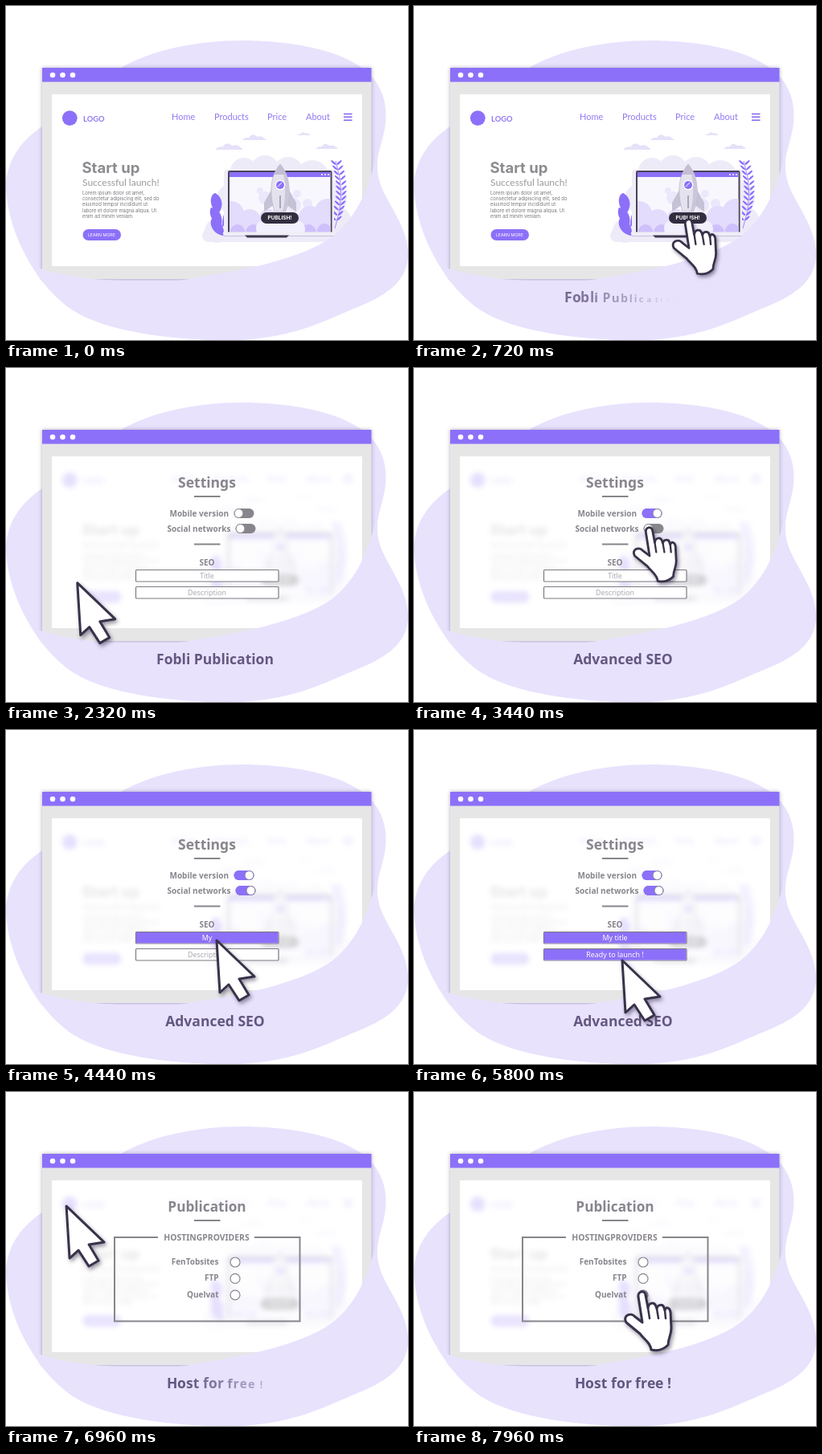
These frames come from a looping animation (500 px wide and 416 px high, 8000 ms). An HTML page:

```html
<!DOCTYPE html>
<html lang="en">
<head>
<meta charset="utf-8">
<title>Publication steps</title>
<style>
html, body { margin: 0; width: 100%; height: 100%; overflow: hidden; background: #fff; }
#stage { position: absolute; left: 0; top: 0; width: 500px; height: 416px; overflow: hidden; }
svg { position: absolute; left: 0; top: 0; }
text { white-space: pre; }
.ui { font: 700 10px "Noto Sans", sans-serif; fill: #88858c; }
.head { font-size: 17.5px; text-anchor: middle; }
.mid { text-anchor: middle; }
.end { text-anchor: end; }
.field { font: 400 8.9px "Noto Sans", sans-serif; text-anchor: middle; }
.nav { font: 400 11px Lato, sans-serif; fill: #9379f2; }
.small { font-family: Inter, sans-serif; }
.caption { position: absolute; left: 0; width: 520px; top: 349.5px; text-align: center; white-space: pre;
  font: 700 17.5px/24px "Noto Sans", sans-serif; color: #62587f; }
.caption span { display: inline-block; transform-origin: 50% 76%; }
#cursor { filter: drop-shadow(2px 3px 2.5px rgba(30, 20, 50, .45)); }
#cursor path { fill: #fff; stroke: #39324a; stroke-width: 3; stroke-linejoin: round; stroke-linecap: round; }
</style>
</head>
<body>
<div id="stage">
<svg width="500" height="416" viewBox="0 0 500 416">
  <defs>
    <path id="blob" d="M143 77C180 55 238 43 292 43C350 43 410 53 443 77C473 99 477 133 469 162C463 184 457 199 467 226C478 252 500 277 500 310C499 345 470 362 432 377C395 392 354 416 275 416C205 416 125 405 85 380C38 350 0 280 0 222C2 190 20 167 45 150Z"/>
    <clipPath id="inBlob"><use href="#blob"/></clipPath>
    <clipPath id="screen"><rect x="278" y="207" width="125.5" height="75"/></clipPath>
    <clipPath id="sheet"><rect x="57" y="110" width="386" height="214"/></clipPath>
  </defs>
  <use href="#blob" fill="#e8e2fd"/>

  <g style="filter:drop-shadow(0 0 2.5px rgba(60,50,90,.4))">
    <rect x="45" y="77" width="409.5" height="263" fill="#e6e6e7"/>
  </g>
  <rect x="45" y="77" width="409.5" height="17.5" fill="#8c70f9"/>
  <g fill="#fff"><circle cx="58" cy="86" r="3.3"/><circle cx="70.5" cy="86" r="3.3"/><circle cx="83" cy="86" r="3.3"/></g>
  <rect x="57" y="110" width="386" height="214" fill="#fff"/>

  <g clip-path="url(#sheet)"><g id="page">
    <circle cx="79.3" cy="139.6" r="9.4" fill="#8c70f9"/>
    <text class="nav" x="96" y="143.5" style="font-weight:700;font-size:9.4px">LOGO</text>
    <text class="nav" x="206" y="142">Home</text>
    <text class="nav" x="259" y="142">Products</text>
    <text class="nav" x="325" y="142">Price</text>
    <text class="nav" x="373" y="142">About</text>
    <path d="M420 134.5h10.5M420 138.3h10.5M420 142.2h10.5" stroke="#8563ee" stroke-width="1.5"/>
    <text class="small" x="94.5" y="208" font-size="18.5" font-weight="700" fill="#8c8c90">Start up</text>
    <text x="95" y="224" style="font:400 12px Lato,sans-serif" fill="#9a9a9e">Successful launch!</text>
    <g id="copy" class="small" font-size="5.9" fill="#77777c"></g>
    <rect x="95.5" y="278" width="47.5" height="14" rx="7" fill="#8c70f9"/>
    <text class="small mid" x="118.8" y="287" font-size="5.3" fill="#fff">LEARN MORE</text>

    <g id="sky" fill="#e6e1f8"></g>
    <g id="backdrop" fill="#eeebf9"></g>
    <path d="M271 286Q264 262 262 238" stroke="#6f55d6" fill="none"/>
    <path d="M264 259C252 251 253 235 260 233C270 238 271 250 264 259ZM268 272C254 270 252 256 255 251C266 253 270 262 268 272ZM271 286C257 285 252 270 256 265C267 267 272 276 271 286ZM269 275C269 261 272 257 274 255C277 264 274 272 269 275Z" fill="#8c70f9"/>
    <path d="M409 277Q424 235 410 193" stroke="#8c70f9" stroke-width=".8" fill="none"/>
    <g id="fern" fill="#8c70f9"></g>

    <rect x="271" y="203.5" width="137" height="82" rx="4" fill="#efedf5"/>
    <rect x="276" y="205" width="129.5" height="79" rx="2" fill="#4a4359"/>
    <rect x="278" y="207" width="125.5" height="75" fill="#f8f7fd"/>
    <g clip-path="url(#screen)">
      <g id="smoke"></g>
      <rect x="278" y="207" width="125.5" height="6" fill="#8c70f9"/>
      <g fill="#fff"><circle cx="393" cy="210" r="1"/><circle cx="397" cy="210" r="1"/><circle cx="401" cy="210" r="1"/></g>
    </g>
    <path d="M270 281.5H407V284Q407 287 402 287H275Q270 287 270 284Z" fill="#f0eef6"/>
    <path d="M271 286.5H407" stroke="#bdb5d6" stroke-width=".8"/>
    <path d="M297 285.5H352L349 288.5H300Z" fill="#40384f"/>

    <path d="M330 229L321 245V256L333 248ZM352 229L361 245V256L349 248Z" fill="#c6c2d6"/>
    <path d="M341 197C327 213 328 237 334 256H348C354 237 355 213 341 197Z" fill="#e4e2ed" stroke="#b9b4cc" stroke-width=".7"/>
    <path d="M341 197C355 213 354 237 348 256H344C349 235 348 213 341 197Z" fill="#cbc7db"/>
    <path d="M341 197Q336 203 333.500 210H348.500Q346 203 341 197Z" fill="#c3bed4"/>
    <circle cx="341" cy="223" r="6.3" fill="#fff"/><circle cx="341" cy="223" r="5" fill="#8c70f9"/>
    <path d="M338 225L343 220" stroke="#cfc3ff" stroke-width="1.4"/>
    <path d="M341 236V252" stroke="#aaa4be" stroke-width="2"/>
    <rect x="317" y="257" width="47" height="14" rx="7" fill="#332e3f"/>
    <text class="small mid" x="340.5" y="266.4" font-size="6.5" font-weight="700" fill="#fff">PUBLISH!</text>
  </g></g>

  <g id="settings" class="ui">
    <text class="head" x="250" y="149">Settings</text>
    <path d="M234 160H266.5M234 219.5H266.5" stroke="#88858c" stroke-width="2"/>
    <text x="203.5" y="184.5">Mobile version</text>
    <text x="200.5" y="203.5">Social networks</text>
    <g id="toggles"></g>
    <text class="mid" x="250" y="246">SEO</text>
    <g id="fields"></g>
  </g>

  <g id="publication" class="ui">
    <text class="head" x="250" y="149" style="font-size:17.2px">Publication</text>
    <path d="M234 160H266.5M189 181H135V285.5H365.5V181H309" stroke="#88858c" stroke-width="2" fill="none"/>
    <text class="mid" x="249.5" y="185" style="font-size:10.4px">HOSTINGPROVIDERS</text>
    <g id="radios"></g>
  </g>

  <g clip-path="url(#inBlob)">
    <path d="M464 165C457 218 438 263 405 288C362 318 285 331 215 342H140Q80 340 36 325V420H510V165Z" fill="#e8e2fd"/>
  </g>
</svg>
<div id="captions"></div>
<svg width="500" height="416" viewBox="0 0 500 416">
  <g id="cursor">
    <path id="arrow" d="M0 0L4 65L15 55L28 75L40 68L28 48L47 45Z"/>
    <g id="hand">
      <path d="M-5 6C-6 -1 3 -3 4 4L7 20C8 13 15 12 17 18L18 21C19 15 26 15 27 20L28 23C29 18 34 19 35 25L36 45C36 54 32 58 32 66Q23 75 11 72C10 63 3 60 -3 52L-20 38C-25 29 -14 25 -9 31L0 38Z"/>
      <path d="M7 20L9 33M18 21L20 33M28 23L29 33" style="fill:none;stroke-width:2.5"/>
    </g>
  </g>
</svg>
</div>
<script>
const LOOP = 8000;
const $ = id => document.getElementById(id);
const clamp = v => Math.min(1, Math.max(0, v));
const ramp = (t, from, to) => clamp((t - from) / (to - from));
const smooth = p => p * p * (3 - 2 * p);
const circles = list => list.map(([x, y, r]) => `<circle cx="${x}" cy="${y}" r="${r}"/>`).join('');

// Page artwork
$('copy').innerHTML = ['Lorem ipsum dolor sit amet,', 'consectetur adipiscing elit, sed do',
  'eiusmod tempor incididunt ut', 'labore et dolore magna aliqua. Ut', 'enim ad minim veniam.']
  .map((line, i) => `<text x="95" y="${235 + i * 7.2}">${line}</text>`).join('');

const cloud = (x, y, w) =>
  `<path d="M${x} ${y}q${w * .12} ${-w * .14} ${w * .27} ${-w * .1}q${w * .14} ${-w * .22} ${w * .34} ${-w * .04}q${w * .2} ${-w * .08} ${w * .39} ${w * .14}z"/>`;
$('sky').innerHTML = cloud(260, 179, 35) + cloud(294, 167, 30) + cloud(362, 161, 17) + cloud(385, 178, 28);

$('backdrop').innerHTML = circles([[296, 206, 17], [322, 204, 18], [351, 207, 19], [381, 212, 20],
  [402, 240, 22], [408, 270, 22], [262, 280, 15], [280, 240, 18]]) + '<rect x="244" y="278" width="181" height="16" rx="8"/>';

let leaves = '';
for (let i = 0; i < 12; i++) {
  const x = 410 + 7 * Math.sin(Math.PI * (i + .5) / 12), y = 197 + i * 6.3;
  leaves += [-1, 1].map(s => `<ellipse cx="${x + s * 3.6}" cy="${y - 2}" rx="4" ry="1.2" transform="rotate(${-s * 42} ${x + s * 3.6} ${y - 2})"/>`).join('');
}
$('fern').innerHTML = leaves;

$('smoke').innerHTML =
  `<g fill="#ece8fb">${circles([[322, 239, 8], [316, 230, 4], [362, 234, 5], [358, 248, 9], [375, 246, 6]])}</g>` +
  `<g fill="#e3dcfc">${circles([[280, 259, 16], [303, 266, 13], [326, 264, 11], [355, 268, 12], [378, 263, 14], [400, 256, 16]])}<rect x="278" y="266" width="126" height="18"/></g>` +
  `<g fill="#cdc0fb">${circles([[288, 281, 9], [308, 282, 10], [376, 282, 10], [396, 280, 9]])}</g>` +
  `<g fill="#f3f0fe">${circles([[322, 277, 11], [341, 277, 13], [361, 278, 11]])}</g>`;

// Panel controls
const svgGroup = (parent, markup) => {
  const g = document.createElementNS('http://www.w3.org/2000/svg', 'g');
  g.innerHTML = markup;
  $(parent).append(g);
  return g.children;
};

const toggles = [[283.5, 181, 3040], [285.5, 200, 3500]].map(([x, y, on]) => {
  const [, fill, knob] = svgGroup('toggles',
    `<rect x="${x}" y="${y - 6}" width="25" height="12" rx="6" fill="#88858c"/>
    <rect x="${x}" y="${y - 6}" width="25" height="12" rx="6" fill="#8c70f9"/>
    <circle cx="${x + 6}" cy="${y}" r="5.4" fill="#fff" stroke="#88858c" stroke-width=".9"/>`);
  return { fill, knob, on };
});

const fields = [['Title', 'My title', 251.5, 4240], ['Description', 'Ready to launch !', 272.5, 5040]].map(([hint, value, y, start]) => {
  const [, fill, label, typed] = svgGroup('fields',
    `<rect x="161.5" y="${y}" width="177.5" height="14.5" rx="1" fill="#fff" stroke="#7d7a82" stroke-width="1.2"/>
    <rect x="162" y="${y + .5}" width="176.5" height="13.5" fill="#8c70f9"/>
    <text class="field" x="250" y="${y + 10.5}" fill="#aaa7ae">${hint}</text>
    <text class="field" x="250" y="${y + 10.5}" fill="#fff"></text>`);
  return { fill, label, typed, value, start };
});

$('radios').innerHTML = ['FenTobsites', 'FTP', 'Quelvat'].map((name, i) => {
  const y = 212 + i * 20.4;
  return `<text class="end" x="264.5" y="${y + 3}">${name}</text><circle cx="285" cy="${y}" r="6" fill="#fff" stroke="#88858c" stroke-width="1.2"/>`;
}).join('') + '<circle id="choice" cx="285" cy="252.8" r="6" fill="#88858c"/>';

// Captions enter letter by letter
const captions = [['Fobli Publication', 200, 2320], ['Advanced SEO', 2500, 5960], ['Host for free !', 6315, LOOP]].map(([text, start, leave]) => {
  const box = document.createElement('div');
  box.className = 'caption';
  const letters = [...text].map(ch => {
    const span = document.createElement('span');
    span.textContent = ch === ' ' ? '\u00a0' : ch;
    box.append(span);
    return span;
  });
  $('captions').append(box);
  return { box, letters, start, leave };
});

// Cursor route: time, x, y
const route = [[0, 425, 425], [600, 342, 266], [800, 342, 266], [1100, 160, 294], [1280, 52, 272], [1440, 34, 264],
  [2040, 88, 268], [2300, 88, 268], [2900, 298, 176], [3120, 298, 176], [3340, 293, 199], [3520, 293, 199],
  [3720, 326, 225], [4000, 290, 245], [4240, 262, 262], [4800, 262, 262], [5040, 259, 287], [5820, 259, 287],
  [6100, 110, 215], [6340, 30, 146], [6520, 53, 121], [6960, 75, 142], [7320, 290, 205], [7420, 290, 205],
  [7720, 284, 249], [8000, 284, 249]];
const handTimes = [[500, 860], [2800, 3860], [7200, 8000]];
const clicks = [700, 3020, 3440, 7820];

const slope = (i, k) => (route[i + 1][k] - route[i][k]) / (route[i + 1][0] - route[i][0]);
function tangent(i, k) {
  if (i === 0 || i === route.length - 1) return 0;
  const a = slope(i - 1, k), b = slope(i, k);
  return a * b <= 0 ? 0 : 2 * a * b / (a + b);
}
function along(t, k) {
  let i = 0;
  while (i < route.length - 2 && t >= route[i + 1][0]) i++;
  const span = route[i + 1][0] - route[i][0], p = (t - route[i][0]) / span, q = 1 - p;
  return q * q * (1 + 2 * p) * route[i][k] + p * p * (3 - 2 * p) * route[i + 1][k] +
    span * p * q * (q * tangent(i, k) - p * tangent(i + 1, k));
}

function draw(t) {
  const veil = smooth(ramp(t, 1360, 2000));
  $('page').style.filter = veil ? `blur(${3 * veil}px)` : 'none';
  $('page').style.opacity = 1 - .78 * veil;
  $('settings').style.opacity = ramp(t, 1640, 2040) * (1 - ramp(t, 6520, 6680));
  $('publication').style.opacity = ramp(t, 6640, 6900);
  $('choice').style.opacity = ramp(t, 7820, 7900);

  for (const { fill, knob, on } of toggles) {
    const p = smooth(ramp(t, on, on + 160));
    fill.style.opacity = p;
    knob.setAttribute('transform', `translate(${13 * p})`);
  }
  for (const { fill, label, typed, value, start } of fields) {
    const p = ramp(t, start, start + 120);
    fill.style.opacity = p;
    label.style.opacity = 1 - p;
    typed.textContent = value.slice(0, Math.floor(value.length * ramp(t, start + 80, start + 540)));
  }
  for (const { box, letters, start, leave } of captions) {
    box.style.opacity = 1 - ramp(t, leave, leave + 280);
    letters.forEach((span, i) => {
      const from = start + i * 30, q = 1 - ramp(t, from, from + 500);
      span.style.transform = `scale(${1 - q * q})`;
      span.style.opacity = ramp(t, from, from + 600);
    });
  }

  const isHand = handTimes.some(([a, b]) => t >= a && t < b);
  const press = Math.max(...clicks.map(c => 1 - Math.abs(t - c) / 120), 0);
  $('arrow').style.display = isHand ? 'none' : '';
  $('hand').style.display = isHand ? '' : 'none';
  $('cursor').setAttribute('transform', `translate(${along(t, 1)} ${along(t, 2)}) scale(${1 - .08 * press})`);
}

const begin = performance.now();
function tick() {
  draw((performance.now() - begin) % LOOP);
  requestAnimationFrame(tick);
}
tick();
</script>
</body>
</html>
```
